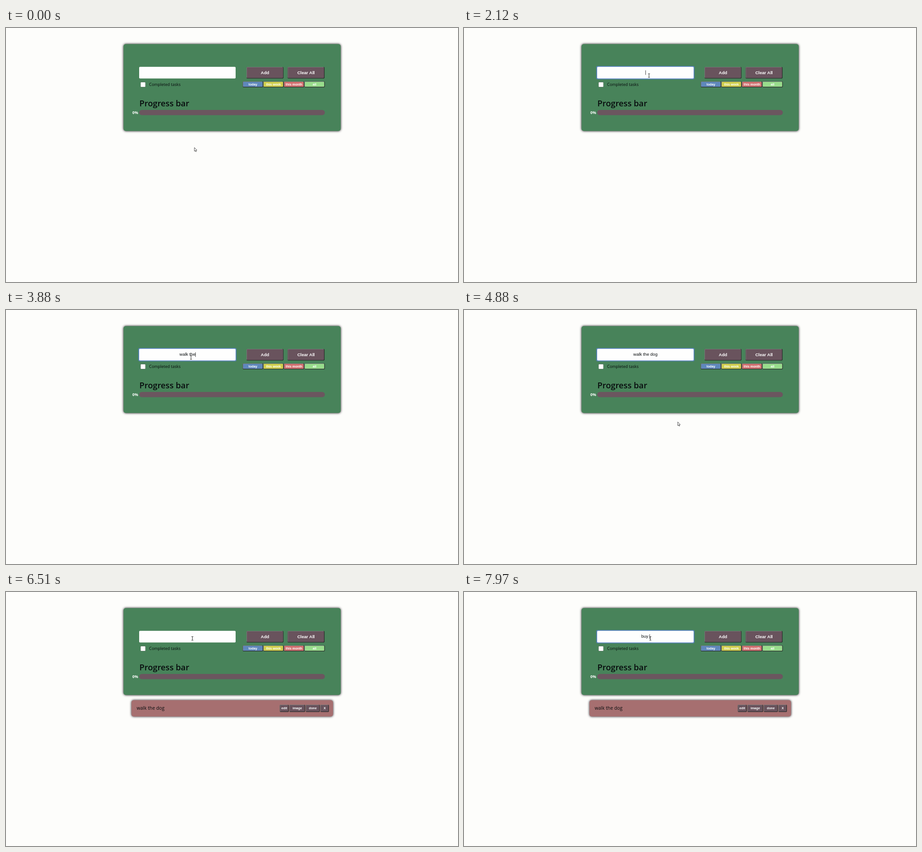
Recreate the animation shown at these times as an HTML page with a canvas. Size 998 by 561 pixels, loop 8 s.

```html
<!DOCTYPE html>
<html lang="en">
<head>
<meta charset="utf-8">
<title>Task list</title>
<style>
html, body { margin: 0; width: 100%; height: 100%; overflow: hidden; background: #fdfdfb; }
canvas { display: block; }
</style>
</head>
<body>
<canvas id="stage" width="998" height="561"></canvas>
<script>
const ctx = document.getElementById('stage').getContext('2d');
const LOOP = 8000, KEY_STEP = 115, BLINK = 500, ADD_TIME = 6000;
const ARIAL = '"Liberation Sans", Arial, sans-serif';
const HUMAN = '"Open Sans", "Noto Sans", sans-serif';
const PLUM = '#69535d';

const field = { x: 294, y: 85.7, w: 213, h: 25.8 };
const card = { x: 259.5, y: 35.5, w: 479.5, h: 192 };
const item = { x: 277, y: 239, w: 445, h: 36 };

// Pointer moves: each travels in a straight line to its spot
const rest = { x: 416, y: 264 };
const moves = [
  { start: 650, end: 1360, x: 382.5, y: 147 },
  { start: 1360, end: 1720, x: 408.5, y: 105 },
  { start: 4480, end: 4900, x: 475, y: 254 },
  { start: 4900, end: 5520, x: 578.5, y: 95.5 },
  { start: 6080, end: 6440, x: 411.5, y: 102.5 }
];
const entries = [
  { text: 'walk the dog', focus: 1800, typing: 2980, blur: ADD_TIME },
  { text: 'buy ', focus: 6750, typing: 7560, blur: LOOP }
];

// Button rows follow from one width and pitch each
const row = (labels, fills, x, y, w, h, pitch, size) => labels.map((label, i) =>
  ({ label, fill: fills[i % fills.length], x: x + i * pitch, y, w, h, size }));
const controls = [
  ...row(['Add', 'Clear All'], [PLUM], 531, 86, 81.7, 25.5, 90.6, 9.5),
  ...row(['today', 'this week', 'this month', 'all'],
    ['#5f88bc', '#d0cf4d', '#d1706f', '#98dd8c'], 522.6, 118, 45, 13, 45.4, 7.2)
];

const clamp = (v, low, high) => Math.max(low, Math.min(high, v));
const contains = (b, p) => p.x >= b.x && p.x <= b.x + b.w && p.y >= b.y && p.y <= b.y + b.h;

function box(x, y, w, h, r, fill) {
  ctx.beginPath();
  ctx.roundRect(x, y, w, h, r);
  ctx.fillStyle = fill;
  ctx.fill();
}

function text(str, x, y, font, color = '#080c0e', align = 'left') {
  ctx.font = font;
  ctx.textAlign = align;
  ctx.fillStyle = color;
  ctx.fillText(str, x, y);
}

function panel({ x, y, w, h }, fill) {
  ctx.save();
  ctx.shadowColor = '#1c141c';
  ctx.shadowBlur = 5.5;
  box(x, y, w, h, 5, fill);
  ctx.restore();
}

function button({ label, x, y, w, h, fill, size }) {
  box(x, y, w, h, 2, '#222');
  box(x, y, w - 1.2, h - 1.2, 1.5, '#767676');
  box(x + 1.1, y + 1.1, w - 2.3, h - 2.3, 1, fill);
  text(label, x + w / 2, y + h / 2 + size * .29, `bold ${size}px ${ARIAL}`, '#fff', 'center');
}

function pointerAt(t) {
  return moves.reduce((p, m) => {
    const k = clamp((t - m.start) / (m.end - m.start), 0, 1);
    return { x: p.x + (m.x - p.x) * k, y: p.y + (m.y - p.y) * k };
  }, rest);
}

function beam() {
  box(-.5, -4, 1, 8, 0, '#333');
  for (const y of [-4.5, 3.6]) box(-2.2, y, 4.4, .9, 0, '#333');
}

// Finger and palm, first as a dark outline, then white
function hand() {
  for (const [grow, color] of [[.7, '#222'], [0, '#fff']]) {
    box(-.6 - grow, -grow, 1.6 + 2 * grow, 7 + 2 * grow, 1, color);
    box(-2.2 - grow, 4.2 - grow, 7 + 2 * grow, 6.2 + 2 * grow, 2, color);
  }
}

function arrow() {
  const shape = new Path2D('M0 0V8.2L1.8 6.6 3.1 9.3 4.3 8.7 3.1 6.1 5.5 5.9Z');
  ctx.fillStyle = '#fff';
  ctx.fill(shape);
  ctx.strokeStyle = '#222';
  ctx.lineWidth = .8;
  ctx.stroke(shape);
}

function drawPointer(t) {
  const p = pointerAt(t);
  const shape = contains(field, p) ? beam : controls.some(c => contains(c, p)) ? hand : arrow;
  ctx.save();
  ctx.translate(p.x, p.y);
  shape();
  ctx.restore();
}

function drawField(t) {
  const { x, y, w, h } = field;
  const entry = entries.find(e => t >= e.focus && t < e.blur);
  if (entry) box(x - 1.8, y - 1.8, w + 3.6, h + 3.6, 3, '#5783bd');
  box(x, y, w, h, 2, '#fefefe');
  if (!entry) return;
  const count = clamp(Math.floor((t - entry.typing) / KEY_STEP) + 1, 0, entry.text.length);
  const typed = entry.text.slice(0, count);
  const font = `9.5px ${ARIAL}`;
  ctx.font = font;
  const width = ctx.measureText(typed).width, left = x + (w - width) / 2;
  text(typed, left, 101, font);
  const lastChange = count ? entry.typing + (count - 1) * KEY_STEP : entry.focus;
  if ((t - lastChange) % (2 * BLINK) < BLINK) box(left + width, 93.5, .9, 10, 0, '#222');
}

// Item buttons take their label's width and stack leftwards from the right end
function drawItem() {
  const size = 7.2;
  panel(item, '#a66f70');
  text('walk the dog', 288.5, 260, `500 10.4px ${HUMAN}`);
  let right = item.x + item.w - 9;
  for (const label of ['X', 'done', 'image', 'edit']) {
    ctx.font = `bold ${size}px ${ARIAL}`;
    const w = ctx.measureText(label).width + (label === 'edit' ? 7 : 14);
    button({ label, x: right - w, y: 249, w, h: 16, fill: PLUM, size });
    right -= w + 1.3;
  }
}

function draw(now) {
  const t = now % LOOP;
  box(0, 0, 998, 561, 0, '#fdfdfb');
  panel(card, '#48835a');
  drawField(t);
  controls.forEach(button);
  box(297, 119.5, 11, 11, 1.5, '#767676');
  box(297.5, 120, 10, 10, 1, '#fff');
  text('Completed tasks', 316, 128.3, `500 8.95px ${HUMAN}`);
  text('Progress bar', 294.5, 173, `600 18.2px ${HUMAN}`);
  text('0%', 279, 190.3, `bold 8.6px ${HUMAN}`, '#fff');
  box(294, 181, 410, 11.5, 5.75, '#6b565f');
  if (t >= ADD_TIME) drawItem();
  drawPointer(t);
  requestAnimationFrame(draw);
}
requestAnimationFrame(draw);
</script>
</body>
</html>
```
